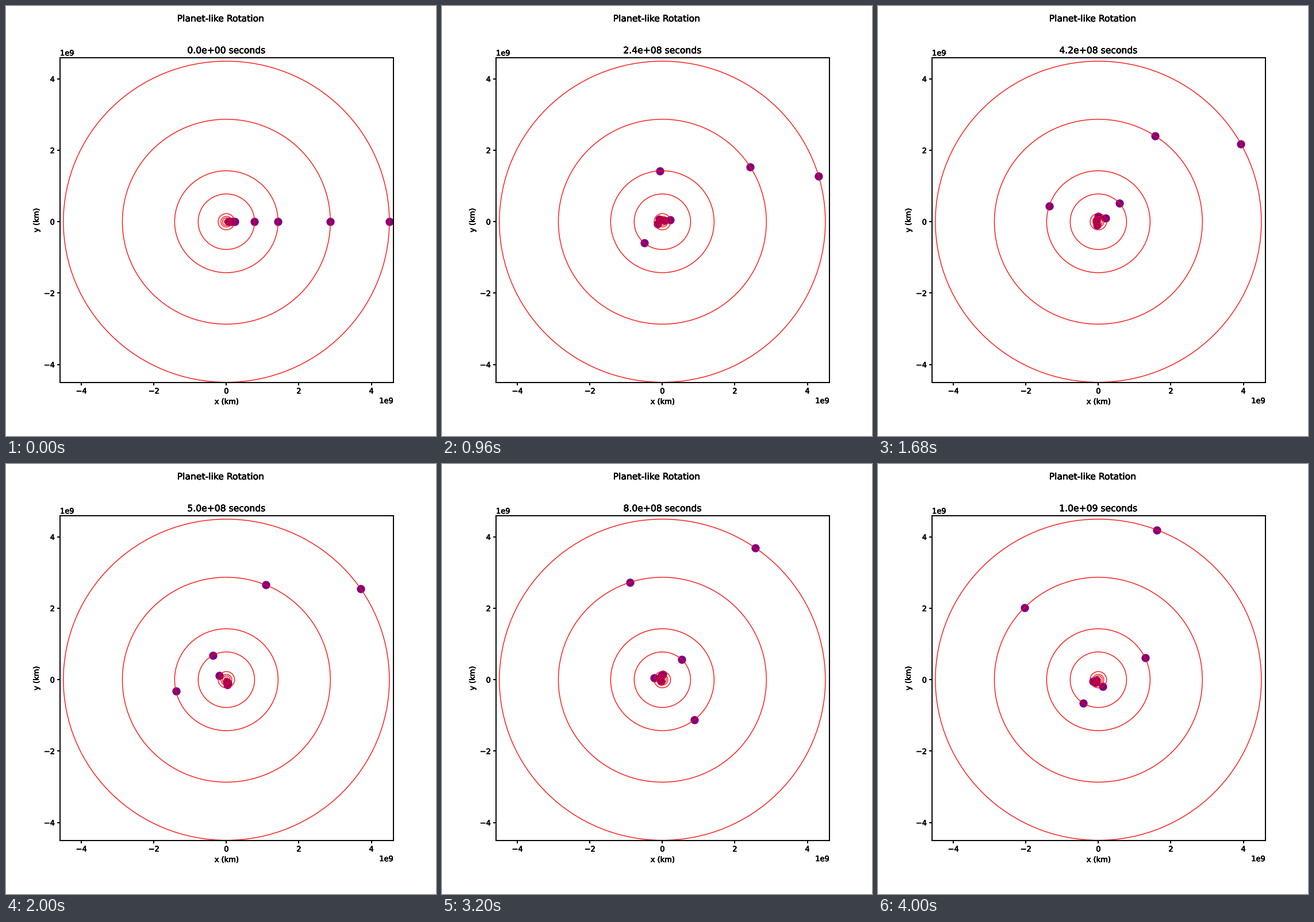
A matplotlib script that plays this animation: 748x748 px, repeating every 4.04 s.

```python
import matplotlib.pyplot as plt
import numpy as np
from matplotlib.animation import FuncAnimation
from matplotlib.patches import Circle
from matplotlib.patheffects import Normal, Stroke

SIZE, DPI = 748, 93.5
FRAMES, INTERVAL = 101, 40
STEP = 1e7     # simulated seconds per frame
AU = 1.496e8   # km
YEAR = 3.17e7  # seconds

# Mean distances in AU; Kepler's third law gives the angular speeds.
distance = np.array([0.39, 0.72, 1, 1.52, 5.2, 9.54, 19.18, 30.06])
radius = distance * AU
speed = 2 * np.pi / (YEAR * distance ** 1.5)

plt.rcParams["font.family"] = "DejaVu Sans"
plt.rcParams["axes.linewidth"] = 1.5

fig = plt.figure(figsize=(SIZE / DPI, SIZE / DPI), dpi=DPI, facecolor="white")
ax = fig.add_axes((94 / SIZE, 93 / SIZE, 580 / SIZE, 565 / SIZE))
ax.set_xlim(-4.589e9, 4.61e9)
ax.set_ylim(-4.505e9, 4.593e9)
ax.tick_params(width=1.5)

heading = fig.suptitle("Planet-like Rotation")
title = ax.set_title("", x=0.499)
texts = [heading, title, ax.set_xlabel("x (km)"), ax.set_ylabel("y (km)", labelpad=4.5)]
for axis in (ax.xaxis, ax.yaxis):
    texts += [axis.get_offset_text(), *axis.get_ticklabels()]
# A thin outline and layered passes give the lettering its heavy, hard edge.
heavy = [Stroke(linewidth=0.4, foreground="black")] + [Normal()] * 3
for text in texts:
    text.set_path_effects(heavy)

planets, = ax.plot([], [], "o", color="purple", markersize=10, zorder=1)
for r in radius:
    ax.add_patch(Circle((0, 0), r, fill=False, edgecolor="red", linewidth=1, zorder=2))


def update(i):
    t = i * STEP
    planets.set_data(radius * np.cos(speed * t), radius * np.sin(speed * t))
    title.set_text(f"{t:.1e} seconds")
    return planets, title


anim = FuncAnimation(fig, update, frames=FRAMES, interval=INTERVAL,
                     repeat=True, repeat_delay=0, blit=False)
plt.show()
```
